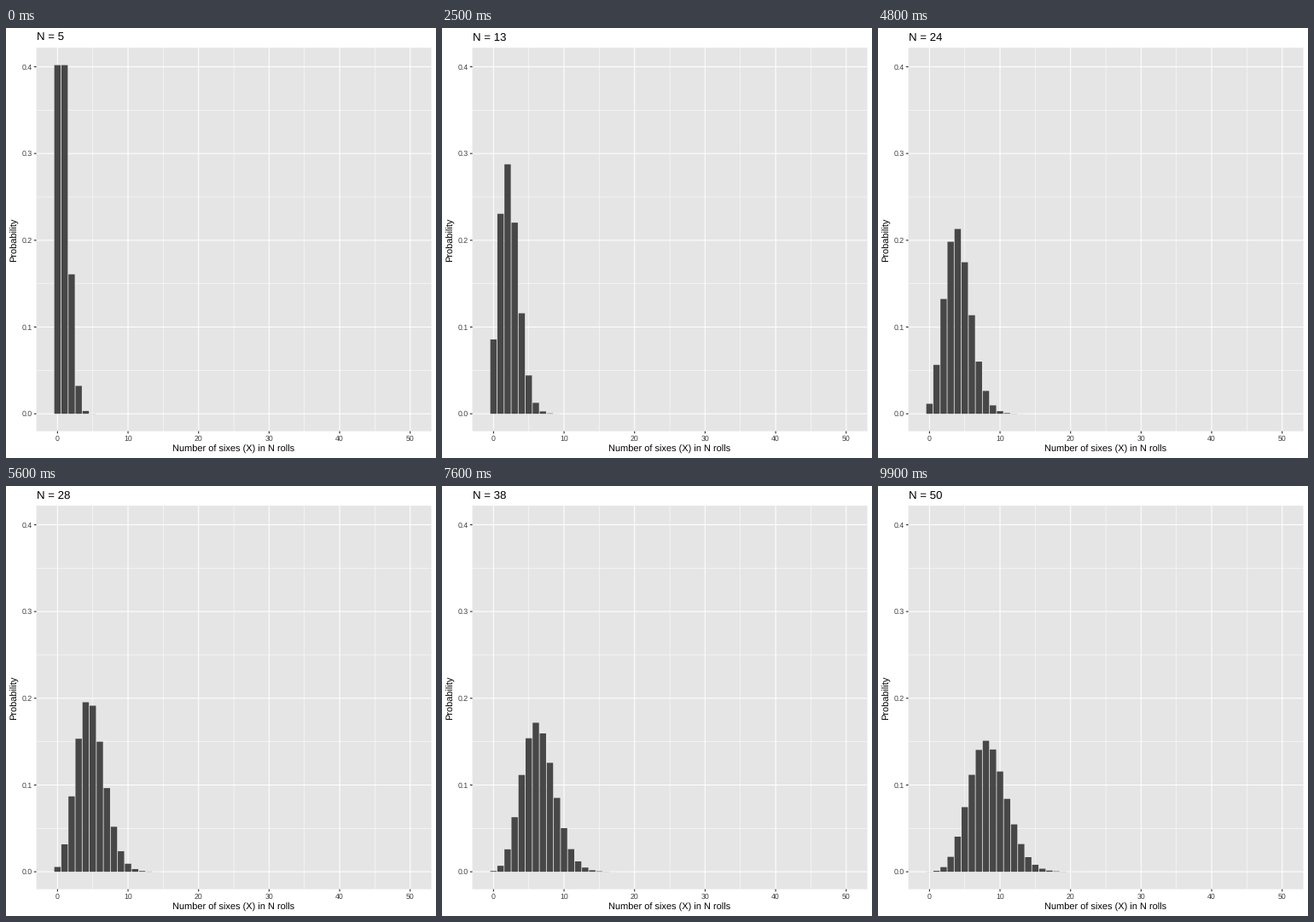
Animation of 504x504 px, one loop 10 s. Source, as a matplotlib script:

```python
from math import comb

import matplotlib
matplotlib.rcParams["text.hinting"] = "none"
matplotlib.rcParams["font.family"] = "Liberation Sans"

import matplotlib.pyplot as plt
from matplotlib.animation import FuncAnimation
from matplotlib.patches import Rectangle

SIZE, DPI = 504, 72
FRAMES, INTERVAL = 100, 100
LEFT, RIGHT, TOP, BOTTOM = 35.6, 498.5, 23.1, 472.6
X_MAX, BAR = 50, 0.9
P = 1 / 6

PANEL, BARS = "#e5e5e5", "#474747"
TICK, TICK_TEXT = "#252525", "#3d3d3d"


def binom(n, k):
    return comb(n, k) * P**k * (1 - P)**(n - k)


# Both axes fit the data plus a 5 % margin at each end.
PEAK = binom(5, 0)
X_UNIT = (RIGHT - LEFT) / ((X_MAX + BAR) * 1.1)
Y_UNIT = (BOTTOM - TOP) / (PEAK * 1.1)


def px(x):
    return LEFT + (x + BAR / 2 + 0.05 * (X_MAX + BAR)) * X_UNIT


def py(y):
    return BOTTOM - (y + 0.05 * PEAK) * Y_UNIT


fig = plt.figure(figsize=(SIZE / DPI, SIZE / DPI), dpi=DPI, facecolor="white")
ax = fig.add_axes([0, 0, 1, 1])
ax.set_xlim(0, SIZE)
ax.set_ylim(SIZE, 0)
ax.axis("off")


def line(xs, ys, color, width, z):
    ax.plot(xs, ys, color=color, lw=width, zorder=z, snap=False,
            solid_capstyle="butt")


def label(x, y, text, size, color="black", **kw):
    kw = {"ha": "center", "va": "baseline", **kw}
    return ax.text(x, y, text, fontsize=size, color=color, **kw)


def rect(x, y, w, h, color, z):
    return ax.add_patch(Rectangle((x, y), w, h, fc=color, lw=0, zorder=z,
                                  snap=False))


rect(LEFT, TOP, RIGHT - LEFT, BOTTOM - TOP, PANEL, 0)

# Minor grid
for i in range(5):
    x = px(5 + 10 * i)
    line([x, x], [TOP, BOTTOM], "white", 0.53, 1)
for i in range(4):
    y = py(0.05 + 0.1 * i)
    line([LEFT, RIGHT], [y, y], "white", 0.53, 1)

# Major grid, ticks and tick labels
for i in range(6):
    x = px(10 * i)
    line([x, x], [TOP, BOTTOM], "white", 1.07, 2)
    line([x, x], [BOTTOM, BOTTOM + 2.74], TICK, 1.07, 4)
    label(x, 484, str(10 * i), 8.8, TICK_TEXT)
for i in range(5):
    y = py(0.1 * i)
    line([LEFT, RIGHT], [y, y], "white", 1.07, 2)
    line([LEFT - 2.74, LEFT], [y, y], TICK, 1.07, 4)
    label(LEFT - 4.95, y + 3.2, f"{0.1 * i:.1f}", 8.8, TICK_TEXT, ha="right")

label((LEFT + RIGHT) / 2, 497, "Number of sixes (X) in N rolls", 11)
label(13.4, (TOP + BOTTOM) / 2, "Probability", 11, rotation=90,
      ha="right", va="center").set(ha="center", x=10)
title = label(LEFT, 15, "", 13.2, ha="left")

bars = [rect(px(k - BAR / 2), py(0), BAR * X_UNIT, 0, BARS, 3)
        for k in range(X_MAX + 1)]


def rolls(frame):
    """Number of rolls; a half means midway between two states."""
    if frame <= 27:
        return 5 + frame // 3 + (frame % 3) / 2
    return 14 + (frame - 27) / 2


def update(frame):
    pos = rolls(frame)
    n = int(pos)
    t = pos - n
    for k, bar in enumerate(bars):
        p = binom(n, k) if k <= n else 0
        if t and k <= n:
            p += t * (binom(n + 1, k) - p)
        bar.set_height(-p * Y_UNIT)
    title.set_text(f"N = {n}")
    return [*bars, title]


anim = FuncAnimation(fig, update, frames=FRAMES, interval=INTERVAL,
                     init_func=lambda: update(0), repeat=True, repeat_delay=0)
plt.show()
```
